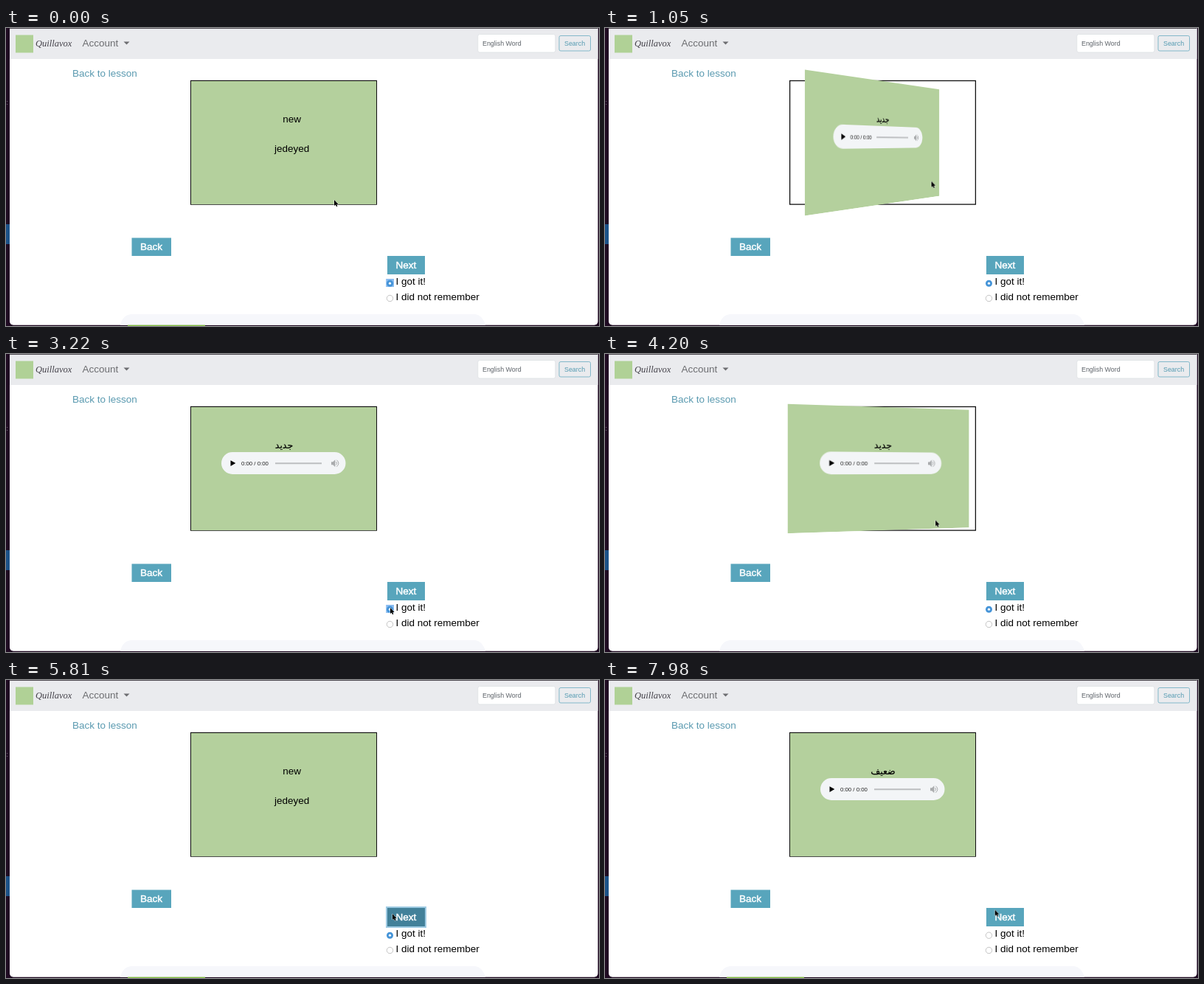
Animation, 804 px wide and 404 px high, one loop 8000 ms. Source, as an HTML page:

```html
<!DOCTYPE html>
<html lang="en">
<head>
<meta charset="utf-8">
<title>Flash card</title>
<style>
html, body { margin: 0; width: 100%; height: 100%; overflow: hidden; background: #1f0a22; }
svg { position: absolute; left: 0; top: 0; overflow: visible; font-family: "Liberation Sans", Arial, sans-serif; font-size: 13.5px; }
#stage { position: absolute; left: 0; top: 0; width: 804px; height: 404px; overflow: hidden; }
#slot { position: absolute; left: 251px; top: 72px; width: 251px; height: 167px; perspective: 563px; }
#card, .face { position: absolute; inset: 0; transform-style: preserve-3d; }
.face { background: #b4d09d; backface-visibility: hidden; transform-style: flat; }
.back { transform: rotateY(180deg); }
.small { font-size: 8.9px; }
.farsi { font-family: "DejaVu Sans", sans-serif; font-size: 12.5px; stroke: #000; stroke-width: .2px; }
.label { fill: #fff; stroke: #fff; stroke-width: .45px; }
.mid { text-anchor: middle; }
</style>
</head>
<body>
<div id="stage">
  <svg width="804" height="404" viewBox="0 0 804 404">
    <text x="-4" y="103.500" class="small" fill="#8d8390">s:</text>
    <rect y="266" width="5" height="27" fill="#1c5288"/>
    <rect x="5" y="-8" width="797.500" height="410.700" rx="5" fill="#fff"/>
    <rect x="5" width="797.500" height="42" fill="#eaebee"/>
    <rect x="5" width="797.500" height=".8" fill="#28242c"/>
    <path d="M155 402.700Q158 389 170 388H636Q646 389 650 402.700Z" fill="#f6f7fb"/>
    <rect id="strip" x="165" y="402.700" width="105" height="1.300" fill="#7fbd3c"/>

    <rect x="13" y="9.500" width="24" height="24" fill="#b0d196"/>
    <text x="40" y="25" fill="#44424a" style="font: italic 12.5px 'Liberation Serif', serif">Quillavox</text>
    <text x="103.500" y="25" fill="#6c6d70">Account</text>
    <path d="M159.500 18.500h8l-4 4z" fill="#6c6d70"/>
    <rect x="639.8" y="8.500" width="105" height="24.500" rx="2.5" fill="#fff" stroke="#d5dade" stroke-width=".6"/>
    <text x="646" y="23.700" class="small" fill="#5c6268">English Word</text>
    <rect x="750" y="10.500" width="42.500" height="20.500" rx="2" fill="none" stroke="#69abc0" stroke-width=".8"/>
    <text x="757" y="23.700" class="small" fill="#559bb2">Search</text>

    <text x="90" y="65.500" fill="#5a9ab0">Back to lesson</text>
    <rect x="250.600" y="71.500" width="251.800" height="167.600" fill="none" stroke="#111" stroke-width="1.3"/>

    <rect x="170.500" y="284.500" width="53.500" height="24.500" fill="#58a5bc"/>
    <text x="182" y="301" class="label">Back</text>
    <rect x="517" y="309" width="51" height="25" fill="#58a5bc"/>
    <rect id="hover" x="517" y="309" width="51" height="25" fill="#42819a"/>
    <rect id="ring" x="516" y="308" width="53" height="27" fill="none" stroke="#9fcbe3" stroke-width="2"/>
    <text x="528.500" y="325.700" class="label">Next</text>

    <rect id="focus" x="515.200" y="340" width="10.800" height="11" fill="#8abcf0"/>
    <g fill="#fff" stroke="#b5b5b5" stroke-width=".8">
      <circle id="empty" cx="520.5" cy="346.200" r="4.2"/>
      <circle cx="520.5" cy="366.500" r="4.2"/>
    </g>
    <g id="checked">
      <circle cx="520.5" cy="346.200" r="4.5" fill="#4594d8"/>
      <circle cx="520.5" cy="346.200" r="1.6" fill="#fff"/>
    </g>
    <text x="528.500" y="348">I got it!</text>
    <text x="528.500" y="368.600">I did not remember</text>
  </svg>

  <div id="slot"><div id="card">
    <div class="face">
      <svg width="251" height="167" viewBox="251 72 251 167">
        <g id="front1" class="mid">
          <text x="387.7" y="127.500">new</text>
          <text x="387.7" y="167.700">jedeyed</text>
        </g>
        <g id="front2" class="mid">
          <text x="387.7" y="127.500">weak</text>
          <text x="387.7" y="167.700">zaeyf</text>
        </g>
      </svg>
    </div>
    <div class="face back">
      <svg width="251" height="167" viewBox="251 72 251 167">
        <text id="back1" x="377" y="128" class="mid farsi">جدید</text>
        <text id="back2" x="377" y="128" class="mid farsi">ضعیف</text>
        <rect x="292" y="133" width="168.500" height="30" rx="15" fill="#f3f5f7"/>
        <path d="M304.500 144.300l6.800 3.800-6.800 3.800z"/>
        <text x="319" y="151" style="font-size: 7.8px" fill="#222">0:00 / 0:00</text>
        <path d="M365 148.200h63" stroke="#bcbec0" stroke-width="2"/>
        <path d="M441 146.200h2.300l3-3v10l-3-3H441z" fill="#a9abad"/>
        <path d="M447.600 146q1.800 2.200 0 4.400M448.400 143.700q5 4.500 0 9" fill="none" stroke="#a9abad"/>
      </svg>
    </div>
  </div></div>

  <svg width="804" height="404" viewBox="0 0 804 404">
    <path id="cursor" d="M0 0V8L1.800 6.400 3 9.200 4.400 8.600 3.200 5.900H5.600Z" fill="#000" stroke="#fff" stroke-width=".8" paint-order="stroke"/>
  </svg>
</div>
<script>
const LOOP = 8000;
const NEXT_CARD = 5980;
const FLIP = 800;

// steps: [ms, value, easing towards the next step]
function loop(id, prop, steps) {
  const frames = steps.map(([ms, value, easing = 'linear']) => ({ offset: ms / LOOP, [prop]: value, easing }));
  if (frames.at(-1).offset < 1) frames.push({ offset: 1, [prop]: frames.at(-1)[prop] });
  document.getElementById(id).animate(frames, { duration: LOOP, iterations: Infinity });
}

// Hard on/off switching; the state toggles at each time given.
function toggle(id, on, ...times) {
  loop(id, 'opacity', [0, ...times].map((ms, i) => [ms, on === (i % 2 === 0) ? 1 : 0, 'step-end']));
}

function turn(...starts) {
  const angle = n => `rotateY(${n % 2 ? -180 : 0}deg)`;
  const turns = starts.flatMap((ms, i) => [[ms, angle(i), 'ease'], [ms + FLIP, angle(i + 1)]]);
  loop('card', 'transform', [[0, angle(0)], ...turns]);
}

const path = [
  [0, 445, 233], [480, 444, 208], [1000, 444, 208], [1400, 398, 199],
  [2450, 398, 199], [3080, 521, 344], [3420, 521, 344], [3900, 446, 220],
  [4130, 446, 220], [4550, 482, 313], [4950, 524, 317], [6080, 524, 317],
  [6600, 440, 215], [7550, 440, 215], [8000, 529, 312]
];
loop('cursor', 'transform', path.map(([ms, x, y]) => [ms, `translate(${x}px, ${y}px)`, 'ease-in-out']));

turn(689, 4136, 6780);
toggle('focus', true, 690, 3150, 4100);
toggle('checked', true, NEXT_CARD);
toggle('empty', false, NEXT_CARD);
toggle('front1', true, NEXT_CARD);
toggle('front2', false, NEXT_CARD);
toggle('back1', true, NEXT_CARD);
toggle('back2', false, NEXT_CARD);
toggle('ring', false, 5700, NEXT_CARD);
toggle('strip', true, 700, 5100);
loop('hover', 'opacity', [[0, 0], [4850, 0], [5000, 1], [6120, 1], [6270, 0]]);
</script>
</body>
</html>
```
